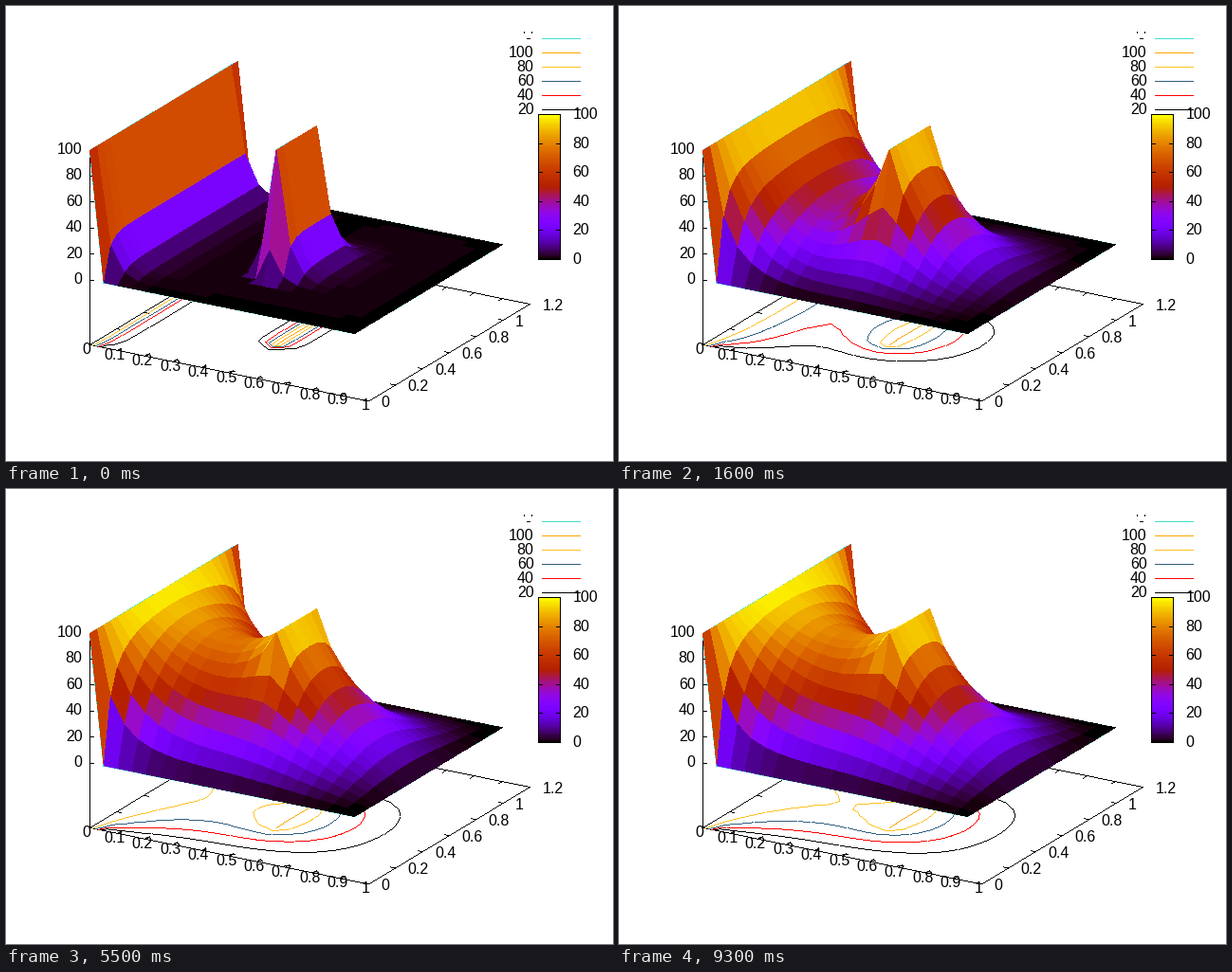
These frames come from a looping animation (640 by 480 pixels, 9400 ms). A matplotlib script:

```python
import numpy as np
import matplotlib.pyplot as plt
from matplotlib.animation import FuncAnimation
from matplotlib.collections import PolyCollection
from matplotlib.colors import to_rgb

plt.rcParams["font.family"] = "Liberation Sans"

FRAMES, INTERVAL = 94, 100
WIDTH, STAGE_H = 640, 480
NX, NY, STEP = 20, 23, 0.05
FONT = 16 * 0.72  # 16 pixels in points at 100 dpi
SHADES = 128
TURQUOISE, ORANGE, GOLD = "#40e0d0", "#ffa500", "#ffc020"
STEEL, RED, BLACK = "#306080", "#ff0000", "#000000"

LEFT, FLOOR = 88.0, 357.0
X_AXIS = np.array([294.0, 59.4])
Y_AXIS = np.array([170.0, -102.4]) / 1.2
RISE, HEIGHT = 68.3, 137.0


def floor_point(x, y):
    """Screen position of (x, y) on the base plane."""
    return (LEFT + x * X_AXIS[0] + y * Y_AXIS[0],
            FLOOR + x * X_AXIS[1] + y * Y_AXIS[1])


def palette():
    g = np.arange(SHADES) / (SHADES - 1)
    blue = np.clip(np.sin(2 * np.pi * g), 0, 1)
    return np.column_stack([np.sqrt(g), g ** 3, blue])


def relax():
    """Plate with a hot wall, a hot ridge and a cold bar behind the ridge."""
    u = np.ones((NX, NY))
    u[:, 0] = u[:, -1] = u[-1, :] = 0
    u[0, :] = 100
    fixed = np.zeros((NX, NY), bool)
    for i, rows, value in ((10, slice(7, 14), 100), (9, slice(16, 20), 0)):
        u[i, rows] = value
        fixed[i, rows] = True
    free = [(i, j) for i in range(1, NX - 1) for j in range(1, NY - 1)
            if not fixed[i, j]]
    states = []
    for _ in range(FRAMES):
        for i, j in free:
            u[i, j] = (u[i - 1, j] + u[i + 1, j] + u[i, j - 1] + u[i, j + 1]) / 4
        states.append(u.copy())
    return states


COLORS = palette()
STATES = relax()
GX, GY = np.meshgrid(np.arange(NX) * STEP, np.arange(NY) * STEP, indexing="ij")
BASE_X, BASE_Y = floor_point(GX, GY)

fig = plt.figure(figsize=(6.4, 4.8), dpi=100, facecolor="white")
ax = fig.add_axes([0, 0, 1, 1])
ax.set_xlim(-0.5, WIDTH - 0.5)
ax.set_ylim(STAGE_H - 0.5, -0.5)
ax.axis("off")
backdrop = np.ones((STAGE_H, WIDTH, 3))


def line(canvas, p, q, color=BLACK):
    """Hard line, one pixel wide."""
    n = int(round(max(abs(q[0] - p[0]), abs(q[1] - p[1])))) + 1
    cols = np.rint(np.linspace(p[0], q[0], n)).astype(int)
    rows = np.rint(np.linspace(p[1], q[1], n)).astype(int)
    canvas[rows, cols] = to_rgb(color)


def polyline(canvas, points, color=BLACK):
    for p, q in zip(points[:-1], points[1:]):
        line(canvas, p, q, color)


def tick(p, dx, dy):
    line(backdrop, p, (p[0] + dx, p[1] + dy))


def label(x, y, text, align):
    """Text whose digits are centred on y."""
    ax.text(x, y + 5.5, text, fontsize=FONT, ha=align, va="baseline", zorder=9)


def draw_box():
    corners = ((0, 0), (1, 0), (1, 1.2), (0, 1.2), (0, 0))
    polyline(backdrop, [floor_point(*c) for c in corners])
    line(backdrop, (LEFT, FLOOR), (LEFT, FLOOR - RISE - HEIGHT))

    for k in range(11):
        x = k / 10
        p = floor_point(x, 0)
        tick(p, 4, -2.4)
        tick(floor_point(x, 1.2), -4, 2.4)
        label(p[0] - 3.5, p[1] + 4, f"{x:g}", "center")
    for k in range(7):
        y = k / 5
        p = floor_point(1, y)
        tick(p, -5, -1)
        tick(floor_point(0, y), 5, 1)
        label(p[0] + 13, p[1] + 1, f"{y:g}", "left")
    for v in range(0, 101, 20):
        y = FLOOR - RISE - HEIGHT * v / 100
        tick((LEFT, y), 4, 0)
        label(80, y - 1.7, str(v), "right")


def draw_key():
    rows = [("100", ORANGE), ("80", GOLD), ("60", STEEL), ("40", RED), ("20", BLACK)]
    line(backdrop, (565, 34), (605, 34), TURQUOISE)
    line(backdrop, (549, 34), (552, 34))
    for x in (546, 554):
        line(backdrop, (x, 27), (x, 28))
    for k, (text, color) in enumerate(rows):
        y = 49 + 15 * k
        line(backdrop, (565, y), (605, y), color)
        label(556, y - 1, text, "right")


def draw_color_bar():
    x0, x1, top, bottom = 561, 584, 114, 267
    for y in range(top, bottom):
        level = (bottom - y) / (bottom - top)
        backdrop[y, x0:x1] = COLORS[min(int(level * SHADES), SHADES - 1)]
    polyline(backdrop, [(x0, top), (x1, top), (x1, bottom), (x0, bottom), (x0, top)])
    for v in range(0, 101, 20):
        y = bottom - (bottom - top) * v / 100
        tick((x0, y), 4, 0)
        tick((x1, y), -4, 0)
        label(597, y - 1, str(v), "left")


def facets(pts, u):
    """Quads from back to front with their colours."""
    def quads(a):
        q = np.stack([a[:-1, :-1], a[1:, :-1], a[1:, 1:], a[:-1, 1:]], axis=2)
        return np.swapaxes(q, 0, 1)[::-1]

    quad = quads(pts).reshape(-1, 4, 2)
    mean = quads(u).reshape(-1, 4).mean(axis=1)
    # hard-edged fills take every pixel they touch, so pull the corners in
    away = quad - quad.mean(axis=1, keepdims=True)
    quad = quad - 0.4 * away / np.linalg.norm(away, axis=2, keepdims=True)
    shade = np.clip((mean * SHADES / 100).astype(int), 0, SHADES - 1)
    return quad, COLORS[shade]


def contour_lines(u):
    cs = ax.contour(BASE_X, BASE_Y, u, levels=[20, 40, 60, 80])
    segments = cs.allsegs
    cs.remove()
    return zip(segments, (BLACK, RED, STEEL, GOLD))


draw_box()
draw_key()
draw_color_bar()

picture = ax.imshow(backdrop, extent=(-0.5, WIDTH - 0.5, STAGE_H - 0.5, -0.5),
                    aspect="auto", interpolation="nearest", zorder=1)
surface = PolyCollection([], linewidths=0, edgecolors="none",
                         antialiaseds=False, zorder=4)
ax.add_collection(surface, autolim=False)


def update(n):
    u = STATES[n]
    canvas = backdrop.copy()
    for segments, color in contour_lines(u):
        for points in segments:
            polyline(canvas, points, color)
    line(canvas, floor_point(0.5, 0.35), floor_point(0.5, 0.65), ORANGE)

    pts = np.stack([BASE_X, BASE_Y - RISE - HEIGHT * u / 100], axis=-1)
    rims = [pts[i] for i in (0, 10, -1)] + [pts[:, j] for j in (0, 7, -1)]
    for rim in rims:
        polyline(canvas, rim - (0.3, 0), TURQUOISE)
    picture.set_data(canvas)

    quad, color = facets(pts, u)
    surface.set_verts(quad)
    surface.set_facecolor(color)
    return picture, surface


anim = FuncAnimation(fig, update, frames=FRAMES, interval=INTERVAL,
                     repeat=True, repeat_delay=0, blit=False)
plt.show()
```
